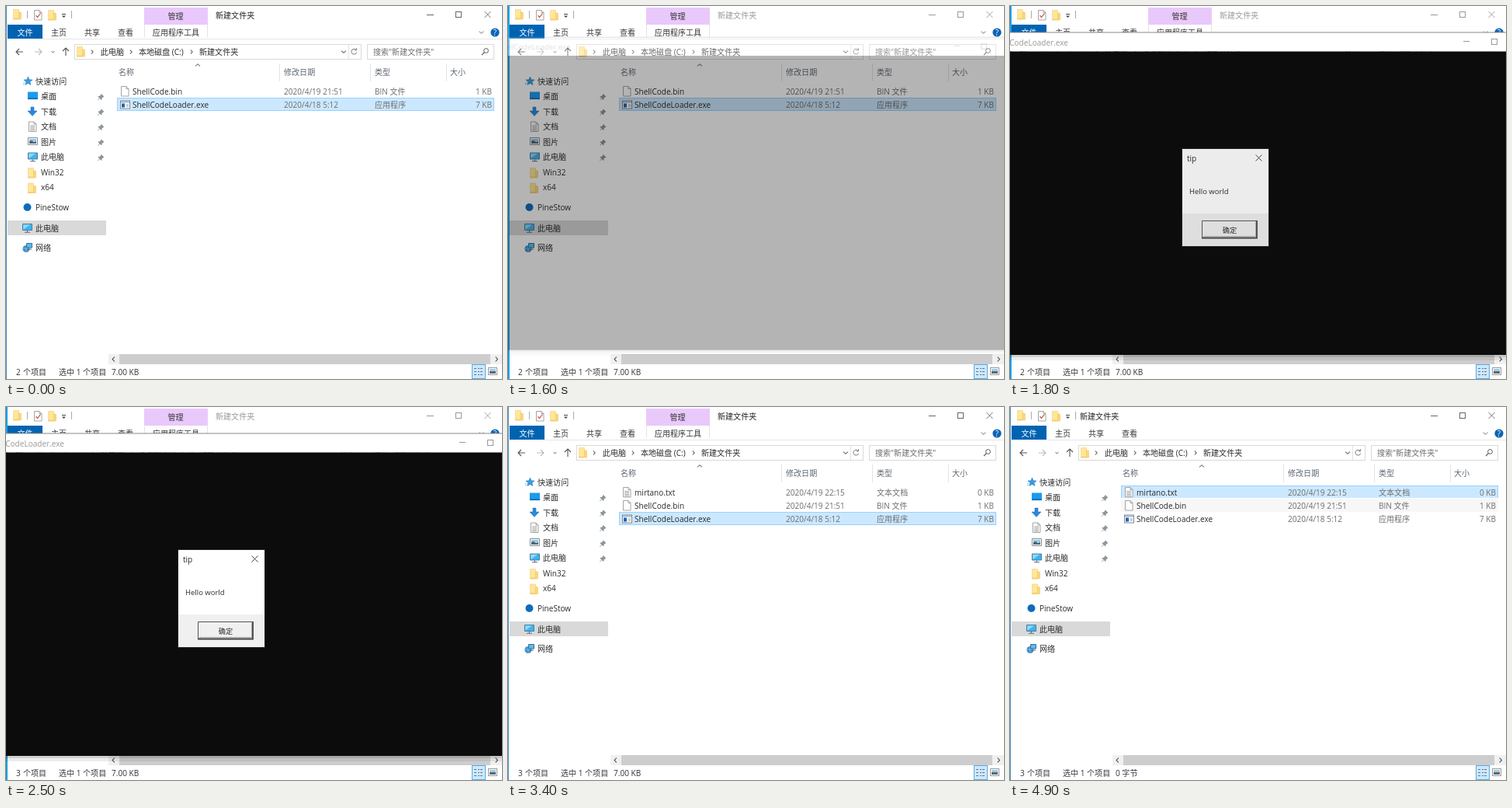
Write an HTML page that moves like this. It is 639 px wide and 480 px high and loops after 5200 ms.

```html
<!DOCTYPE html>
<html lang="zh-CN">
<head>
<meta charset="utf-8">
<title>文件夹</title>
<style>
html, body { margin: 0; width: 100%; height: 100%; overflow: hidden; background: #fff; }
svg { display: block; width: 639px; height: 480px; }
text { font: 10.05px "Open Sans", "Noto Sans CJK SC", "Noto Sans CJK", sans-serif; white-space: pre; }
</style>
</head>
<body>
<svg id="stage" viewBox="0 0 639 480" xmlns="http://www.w3.org/2000/svg"></svg>
<script>
const stage = document.getElementById('stage');
const LOOP = 5200, INK = '#2a2a2a', DIM = '#6d6d6d';

const rect = (x, y, w, h, fill, extra = '') =>
  `<rect x="${x}" y="${y}" width="${w}" height="${h}" fill="${fill}" ${extra}/>`;
const box = (x, y, w, h, fill, line) => rect(x + .5, y + .5, w - 1, h - 1, fill, `stroke="${line}"`);
const path = (d, line, width = 1, fill = 'none') =>
  `<path d="${d}" fill="${fill}" stroke="${line}" stroke-width="${width}"/>`;
const group = (x, y, body) => `<g transform="translate(${x} ${y})">${body}</g>`;
// y is the middle of the line
const text = (x, y, s, fill = INK, anchor = 'start', extra = '') =>
  `<text x="${x}" y="${y + 4}" fill="${fill}" text-anchor="${anchor}" ${extra}>${s}</text>`;
const layer = (id, body) => `<g id="${id}">${body}</g>`;

const chevron = (x, y, dir, line = '#666', r = 2.5) => {
  const h = r * .9;
  const d = {
    right: `M${x - h / 2} ${y - r}l${h} ${r}l${-h} ${r}`,
    left: `M${x + h / 2} ${y - r}l${-h} ${r}l${h} ${r}`,
    down: `M${x - r} ${y - h / 2}l${r} ${h}l${r} ${-h}`,
    up: `M${x - r} ${y + h / 2}l${r} ${-h}l${r} ${h}`
  };
  return path(d[dir], line, 1.1);
};
const cross = (x, y, r, line) => path(`M${x - r} ${y - r}l${2 * r} ${2 * r}m0 ${-2 * r}l${-2 * r} ${2 * r}`, line, .9);

// Small icons, each about 12 px
const folder = (x, y) => group(x, y,
  path('M.5.5h7v12.5h-7z', '#f3cf74', .6, '#ffe699') + path('M7.5 3.5l3 1v8.5h-10v-1h7z', '#f0c765', .6, '#fad77d'));
const sheet = (x, y, marks = '') => group(x, y,
  path('M.5.5h6.5l3 3v9.5h-9.5zM7 .5v3h3', '#9a9a9a', .9, '#fff') + marks);
const lines = path('M2.2 5.5h6M2.2 7.5h6M2.2 9.5h6M2.2 11.3h6', '#8a8a8a', .8);
const screen = (x, y) => group(x, y,
  path('M.5.5h12v8h-12z', '#4b7f9e', 1, '#3fb3ef') + path('M1.2 7.8V1.2h9z', 'none', 0, '#8ed8fb') +
  path('M3 11.3h7M6.5 9v2', '#668', 1.1));
const picture = (x, y) => group(x, y,
  path('M.5.5h12v9h-12z', '#8a8a8a', 1, '#fff') + rect(2, 2, 9, 3, '#8cc8ee') +
  path('M2 8V5l3-1 3 2 3-1v3z', 'none', 0, '#4c6474'));
const app = (x, y) => group(x, y,
  box(0, 0, 13, 11, '#fff', '#7d8a96') + rect(1, 1, 11, 2, '#a9b7c4') +
  rect(2, 4, 4, 5, '#1d66b5') + path('M8 5.5h3M8 7.5h3', '#999'));
const star = (x, y) => group(x, y,
  path('M6.5 0l1.6 3.8 4 .2-3.1 2.6 1 4-3.5-2.1-3.5 2.1 1-4-3.1-2.6 4-.2z', '#1976b8', .5, '#3a9be0') +
  path('M0 8h3M0 10h2', '#79bdec', .8));
const down = (x, y) => path(`M${x + 4} ${y}h4v5h4l-6 6.5-6-6.5h4z`, '#1b6fb3', .5, '#2b88d8');
const desk = (x, y) => rect(x, y, 13, 9, '#1a9af0') + rect(x, y + 8, 13, 1.6, '#0b68ad');
const net = (x, y) => group(x, y,
  '<circle cx="5" cy="7.5" r="4.5" fill="#3d8fc9"/>' + path('M1 7h8M5 3v9', '#a6d8f2', .6) +
  path('M5.5.5h7v5.5h-7z', '#3b6f90', 1, '#56bdf0') + path('M7 8h5', '#567'));
const pin = (x, y) => group(x, y,
  path('M4.8.5l3 3-1 .4-1.7 1.8-.2 1.8-4-4 1.8-.2 1.8-1.8zM2.8 5.6L.3 8.2', '#7b8790', .8, '#8b979f'));

function ribbon() {
  return folder(9, 4) + path('M27.5 6v10M84.5 6v10', '#aaa') +
    sheet(36, 5, path('M2.5 7l2 2.5 4-5', '#c44a2a', 1.2)) + folder(54, 5) +
    path('M72 10.5h5', '#444') + path('M72 12.5h5l-2.5 2.5z', 'none', 0, '#444') +
    layer('tools', rect(178, 2, 82, 22, '#e9c9fb') + text(218.5, 12.5, '管理', '#333', 'middle') +
      path('M178.5 24v16M259.5 24v16', '#e2e2e2') + text(219, 33.5, '应用程序工具', '#333', 'middle')) +
    layer('head', '') +
    rect(2, 24, 45, 18, '#0063b1') + text(24.5, 33.5, '文件', '#fff', 'middle') +
    [['主页', 68], ['共享', 111], ['查看', 154]].map(([s, x]) => text(x, 33.5, s, '#333', 'middle')).join('') +
    path('M47 42.5h592', '#e6e6e6') + chevron(612.5, 34, 'down', '#999', 3) +
    '<circle cx="630" cy="34" r="5.6" fill="#0a64b4"/>' +
    text(630, 34, '?', '#fff', 'middle', 'font-weight="700"');
}

function address() {
  return path('M22 59H13m4-4l-4 4 4 4', '#555', 1.1) + path('M37 59h9m-4-4l4 4-4 4', '#bbb', 1.1) +
    chevron(60.5, 59, 'down', '#999', 2) + path('M77 64v-10m-4 4l4-4 4 4', '#555', 1.1) +
    box(88, 49, 370, 20, '#fff', '#d9d9d9') + folder(91, 52) +
    [111, 161, 239].map(x => chevron(x, 59, 'right', '#555')).join('') +
    text(122, 59, '此电脑') + text(171, 59, '本地磁盘 (C:)') + text(249, 59, '新建文件夹') +
    chevron(435, 59, 'down', '#666', 3) + path('M441.5 50v18', '#e2e2e2') +
    path('M451 56.5a3.4 3.4 0 1 0 .7 3M451.6 54.2v2.6h-2.6', '#777') +
    box(465, 49, 164, 20, '#fff', '#d9d9d9') + text(473, 59, '搜索"新建文件夹"', DIM) +
    '<circle cx="618.5" cy="57.5" r="2.9" fill="none" stroke="#555"/>' + path('M616.3 59.7l-3.3 3.5', '#555', 1.2);
}

function nav() {
  const kids = [['桌面', desk], ['下载', down], ['文档', (x, y) => sheet(x + 1, y - 1, lines)],
    ['图片', picture], ['此电脑', screen], ['Win32', folder], ['x64', folder]];
  const list = kids.map(([s, icon], i) => {
    const y = 116 + 19.5 * i;
    return icon(28, y - 5.5) + text(45, y, s) + (i < 5 ? pin(118, y - 3) : '');
  }).join('');
  return star(22, 91) + text(38, 97, '快速访问') + list +
    '<circle cx="27.5" cy="259" r="5" fill="#0f6cbd"/>' + text(38, 259, 'PineStow') +
    rect(2, 276, 127, 19, '#d9d9d9') + screen(21, 280) + text(38, 285.5, '此电脑') +
    net(21, 305) + text(38, 311, '网络');
}

function columns() {
  return path('M352.5 74v23M469.5 74v23M567.5 74v23', '#e3e3e3') + chevron(247, 76, 'up', '#777', 3) +
    [['名称', 145], ['修改日期', 358], ['类型', 475], ['大小', 572]].map(([s, x]) => text(x, 85, s, '#5c6670')).join('');
}

const file = (id, icon, name, date, type, size) => layer(id,
  icon + text(163, 110, name) + text(358, 110, date, DIM) + text(475, 110, type, DIM) +
  text(626, 110, size, DIM, 'end'));

function footer() {
  return rect(132, 448, 507, 13, '#f0f0f0') + rect(146, 448, 478, 13, '#cdcdcd') +
    chevron(138.5, 454.5, 'left', '#444', 3) + chevron(632, 454.5, 'right', '#444', 3) +
    layer('count', '') + text(22, 470.5, '个项目', '#333') +
    text(68, 470.5, '选中 1 个项目', '#333') + layer('size', '') +
    box(600, 461, 18, 19, '#cce8ff', '#5fa9d8') +
    path('M603 466.5h3M603 470.5h3M603 474.5h3M608 466.5h2M611 466.5h3M608 470.5h2M611 470.5h3M608 474.5h2M611 474.5h3', '#678') +
    box(621, 465, 12, 10, '#fff', '#999') + rect(623, 467, 8, 3, '#9fcbe8') + rect(623, 470, 8, 3, '#5d6a72');
}

function consoleWindow() {
  return rect(-130, 449, 900, 3, '#000', 'opacity=".18"') + rect(-130, 452, 900, 4, '#000', 'opacity=".07"') +
    rect(-130, 34, 900, 24.5, '#fff') + rect(-130, 33.5, 900, 1, '#8a8a8a') +
    rect(-130, 58.5, 900, 390.5, '#0c0c0c') + layer('caption', '');
}

function dialog() {
  return layer('face', '') + layer('ink',
    box(221, 183, 113, 127, 'none', '#222') + text(228, 196, 'tip') + layer('shut', cross(320.5, 195.5, 4, '#333')) +
    text(231, 237.5, 'Hello world', INK, 'start', 'style="font-size:9.5px"') +
    path('M247.5 298.5v-22h70', '#555') + path('M247 298.5h71v-22.5', '#444', 1.8) +
    text(283, 287.5, '确定', INK, 'middle', 'style="font-size:9.2px"'));
}

stage.innerHTML = rect(0, 0, 639, 480, '#fff') + layer('edge', '') + ribbon() + address() + nav() + columns() +
  layer('marks', '') +
  file('txt', sheet(148, 103, lines), 'mirtano.txt', '2020/4/19 22:15', '文本文档', '0 KB') +
  file('bin', sheet(148, 103), 'ShellCode.bin', '2020/4/19 21:51', 'BIN 文件', '1 KB') +
  file('exe', app(147, 104.5), 'ShellCodeLoader.exe', '2020/4/18 5:12', '应用程序', '7 KB') +
  footer() + layer('term', consoleWindow()) + layer('tip', dialog());

const ui = {};
stage.querySelectorAll('g[id]').forEach(g => ui[g.id] = g);
const set = (name, key, value) => ui[name].setAttribute(key, value);
const fill = (name, html) => {
  if (ui[name].last !== html) ui[name].innerHTML = ui[name].last = html;
};
const show = (name, on) => set(name, 'display', on ? 'inline' : 'none');
// Latest step whose start time has passed
const pick = (steps, t) => steps.filter(s => t >= s[0]).pop().slice(1);

// start, opacity, scale
const TERM = [[0, 0, 1], [1600, .3, .97], [1700, .79, .989], [1800, 1, 1], [3300, .5, .975], [3400, 0, 1]];
// start, face opacity, ink opacity, close mark opacity, body, foot
const TIP = [[0, 0, 0, 0, '#fff', '#f0f0f0'], [1700, 0, .8, 1, '#fff', '#f0f0f0'],
  [1800, 1, 1, 1, '#ececec', '#dedede'], [1900, 1, 1, 1, '#fff', '#f0f0f0'],
  [3100, 1, 1, .5, '#fff', '#f0f0f0'], [3200, 1, 1, .06, '#fff', '#f0f0f0'],
  [3300, .3, .3, 0, '#fff', '#f0f0f0'], [3400, 0, 0, 0, '#fff', '#f0f0f0']];
// start, row, colour
const HOVER = [[0, -1, ''], [3800, 1, '#e5f3ff'], [4100, 0, '#e5f3ff'], [4200, -1, ''],
  [4500, 1, '#e5f3ff'], [4600, 1, '#eaf5ff'], [4700, 1, '#eff7fe'], [4800, 1, '#f4f8fb'], [4900, 1, '#f7f7f7']];

// A hovered row is set off by a white line above it
const hover = (y, tone) => rect(143, y - 1, 486, 1, '#fff') + rect(143, y, 486, 17, tone);

function draw(t) {
  const active = t < 1500 || t >= 3400, added = t >= 2500, moved = t >= 4200;
  const ink = active ? '#222' : '#999', button = active ? '#666' : '#999';

  fill('edge', rect(0, 0, active ? 1 : 2, 480, active ? '#3f8fc4' : '#1b9fe5'));
  show('tools', !moved);
  fill('head', text(moved ? 90 : 270, 11.5, '新建文件夹', ink) + path('M542 11.5h9', button) +
    box(579, 7, 8, 8, 'none', button) + cross(620.5, 11, 4, button));

  const shift = added ? 17 : 0;
  show('txt', added);
  set('bin', 'transform', `translate(0 ${shift})`);
  set('exe', 'transform', `translate(0 ${shift + 17})`);
  const [row, tone] = pick(HOVER, t);
  const sel = moved ? 0 : added ? 2 : 1;
  fill('marks', box(143, 101 + 17 * sel, 486, 17, '#cce8ff', '#99d1ff') +
    (row < 0 ? '' : hover(101 + 17 * row, tone)));
  fill('count', text(13, 470.5, added ? '3' : '2', '#333'));
  fill('size', text(136, 470.5, moved ? '0 字节' : '7.00 KB', '#333'));

  const [alpha, scale] = pick(TERM, t);
  set('term', 'opacity', alpha);
  set('term', 'transform', `translate(258 241.5) scale(${scale}) translate(-258 -241.5)`);
  const cap = t >= 3100 ? '#333' : '#999';
  fill('caption', text(75, 46.5, 'ShellCodeLoader.exe', cap, 'end') +
    path('M584 45.5h8', cap) + box(620, 42, 8, 8, 'none', cap));

  const [face, mark, shut, body, foot] = pick(TIP, t);
  set('face', 'opacity', face);
  set('ink', 'opacity', mark);
  set('shut', 'opacity', shut);
  fill('face', rect(221, 183, 113, 84, body) + rect(221, 267, 113, 43, foot) +
    path('M249 296.5h67.5v-19', '#a8a8a8'));
}

const start = performance.now();
function tick() {
  draw((performance.now() - start) % LOOP);
  requestAnimationFrame(tick);
}
tick();
</script>
</body>
</html>
```
